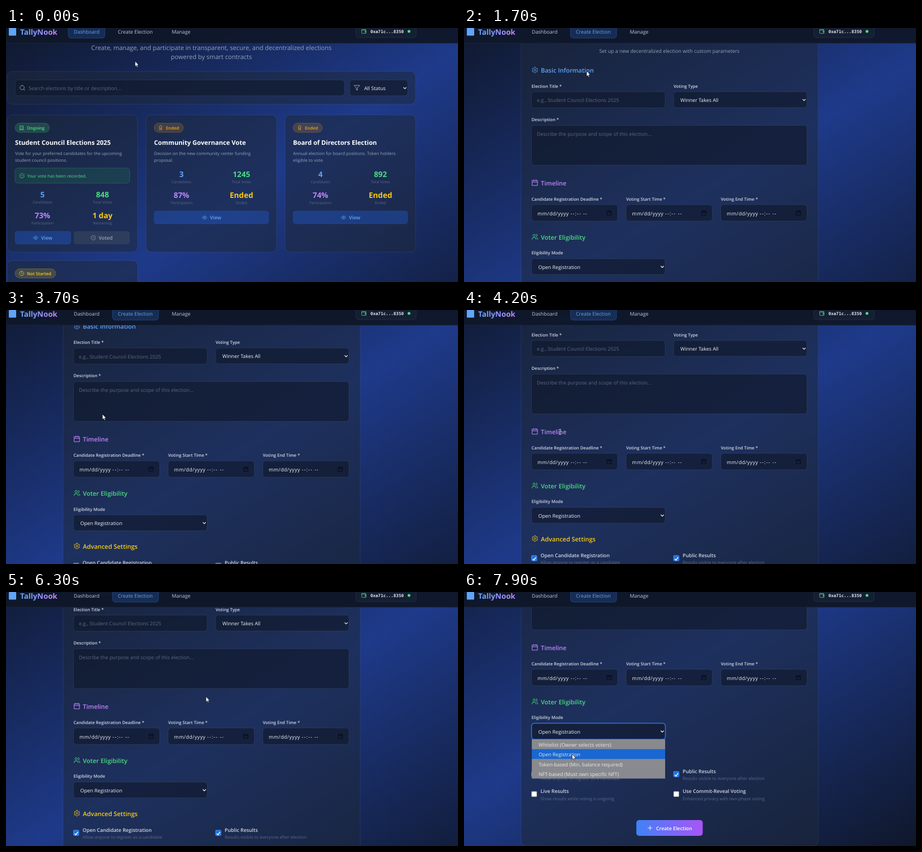
An HTML page for the animation above (8 s loop, 800 px wide and 450 px high).

```html
<!DOCTYPE html>
<html lang="en">
<head>
<meta charset="utf-8">
<title>Election dashboard</title>
<style>
html, body { margin: 0; width: 100%; height: 100%; overflow: hidden; background: #0f172a; }
svg { display: block; width: 800px; height: 450px; }
text { font-family: "Open Sans", "Noto Sans", sans-serif; text-rendering: geometricPrecision; white-space: pre; }
.mono { font-family: "DejaVu Sans Mono", "Noto Sans Mono", monospace; }
</style>
</head>
<body>
<svg id="stage" viewBox="0 0 800 450"></svg>
<script>
const BLUE = '#60a5fa', PURPLE = '#c084fc', GREEN = '#4ade80', YELLOW = '#facc15', ORANGE = '#f0a020';
const MUTED = '#94a3b8', FAINT = '#5b6985', LIGHT = '#d3d8e2';
const FIELD = 'rgba(15,23,42,.62)', EDGE = 'rgba(148,163,184,.13)', PANEL = 'rgba(30,41,59,.55)';

const ring = (x, y, r) => `M${x} ${y - r}a${r} ${r} 0 1 0 .01 0`;
const gear = 'M' + Array.from({ length: 49 }, (_, i) => {
  const a = i * Math.PI / 24, r = 8.8 + 1.5 * Math.cos(6 * a);
  return (12 + r * Math.sin(a)).toFixed(1) + ' ' + (12 - r * Math.cos(a)).toFixed(1);
}).join('L') + 'z' + ring(12, 12, 3);
const ICONS = {
  gear,
  calendar: 'M3 4h18v18H3zM8 2v4M16 2v4M3 10h18',
  users: 'M16 21v-2a4 4 0 0 0-4-4H6a4 4 0 0 0-4 4v2' + ring(9, 7, 4) + 'M22 21v-2a4 4 0 0 0-3-4M16 3a4 4 0 0 1 0 8',
  eye: 'M2 12s4-7 10-7 10 7 10 7-4 7-10 7S2 12 2 12z' + ring(12, 12, 3),
  check: 'M22 11v1a10 10 0 1 1-6-9M9 11l3 3L22 4',
  search: ring(11, 11, 8) + 'M21 21l-4-4',
  filter: 'M22 3H2l8 9.5V19l4 2v-8.5z',
  award: ring(12, 8, 6) + 'M15.5 13L17 22l-5-3-5 3 1.5-9',
  clock: ring(12, 12, 10) + 'M12 6v6l4 2',
  vote: 'M5 4h14v14H5zM2 21h20M9 11l2 2 4-4',
  wallet: 'M20 7V3H4a2 2 0 0 0 0 4h17v14H4a2 2 0 0 1-2-2V5M17 12v4h4v-4z',
  chevron: 'M5 9l7 7 7-7',
  plus: 'M12 4v16M4 12h16'
};

const text = (x, y, s, size, fill, weight = 400, more = '') =>
  `<text x="${x}" y="${y}" font-size="${size}" fill="${fill}" font-weight="${weight}" ${more}>${s}</text>`;
const mid = (x, y, s, size, fill, weight) => text(x, y, s, size, fill, weight, 'text-anchor="middle"');
const box = (x, y, w, h, r, fill, stroke = 'none', more = '') =>
  `<rect x="${x}" y="${y}" width="${w}" height="${h}" rx="${r}" fill="${fill}" stroke="${stroke}" ${more}/>`;
// Icon centred on x, y
const icon = (name, x, y, size, color, width = 2) =>
  `<path d="${ICONS[name]}" transform="translate(${x - size / 2} ${y - size / 2}) scale(${size / 24})" fill="none" stroke="${color}" stroke-width="${width}" stroke-linecap="round" stroke-linejoin="round"/>`;
const field = (x, y, w, h) => box(x, y, w, h, 5, FIELD, EDGE);
const select = (x, y, w, s) => field(x, y, w, 28) + text(x + 12, y + 18, s, 8.85, '#f1f5f9') +
  icon('chevron', x + w - 5, y + 14.3, 8, '#f1f5f9', 3.6);
const label = (x, y, s) => text(x, y, s, 7.65, LIGHT, 600);
const heading = (y, s, name, color) => icon(name, 125.5, y - 4.5, 12, color) + text(136, y, s, 10.95, color, 600);

// Diagonal background whose brightest line crosses the left edge at `centre`
function backdrop(id, slope, centre, half) {
  const at = v => [v * slope / (slope * slope + 1), v / (slope * slope + 1)];
  const [x1, y1] = at(centre - half), [x2, y2] = at(centre + half);
  return `<linearGradient id="${id}" gradientUnits="userSpaceOnUse" x1="${x1}" y1="${y1}" x2="${x2}" y2="${y2}">
    <stop stop-color="#0f172a"/><stop offset=".5" stop-color="#1e3a8a"/><stop offset="1" stop-color="#0f172a"/></linearGradient>
    <rect y="-100" width="800" height="1000" fill="url(#${id})"/>`;
}

function badge(x, y, w, s, name, color) {
  return `<g>${box(x, y, w, 16.5, 8.2, color, color, 'fill-opacity=".18" stroke-opacity=".22"')}
    ${icon(name, x + 11.7, y + 8.2, 9.5, color)}${text(x + 21, y + 11.8, s, 7.7, color, 600)}</g>`;
}

function card(x, y, status, title, lines, stats, voted) {
  const l = x + 14, top = voted ? 299.5 : 263.5, by = voted ? 360 : 324, bw = voted ? 99 : 203;
  const colors = [BLUE, GREEN, PURPLE, YELLOW];
  let s = box(x, y, 231, 243, 9, PANEL, EDGE) + badge(l, y + 14.5, ...status);
  if (!title) return s;
  s += text(l, 207, title, 11.15, '#fff', 700);
  lines.forEach((line, i) => s += text(l, 225 + i * 11.6, line, 7.75, MUTED));
  if (voted) {
    s += box(l, 248, 203, 27, 5, 'rgba(34,197,94,.12)', 'rgba(34,197,94,.25)') +
      icon('check', l + 12.3, 261.7, 9.5, GREEN) + text(l + 21.5, 265, 'Your vote has been recorded.', 7.7, GREEN);
  }
  stats.forEach(([value, name], i) => {
    const cx = x + (i % 2 ? 168.7 : 62.5), cy = top + (i > 1 ? 37.6 : 0);
    s += mid(cx, cy, value, 13.5, colors[i], 700) + mid(cx, cy + 11, name, 6.65, FAINT);
  });
  const vx = voted ? 62 : 361;
  const ex = voted ? vx : x + 113;
  s += box(l, by, bw, 23, 4.5, 'rgba(37,99,235,.32)', 'rgba(59,130,246,.12)') +
    icon('eye', ex - 9.5, by + 11.7, 9.5, BLUE) + text(ex, by + 15.3, 'View', 8.8, BLUE, 600);
  if (voted) {
    s += box(120, by, 99, 23, 4.5, 'rgba(75,85,99,.38)') +
      icon('check', 154.7, by + 11.5, 9.5, MUTED) + text(164, by + 15.3, 'Voted', 8.8, MUTED, 600);
  }
  return s;
}

function dashboard() {
  const stats = (a, b, c, d, e) => [[a, 'Candidates'], [b, 'Total Votes'], [c, 'Participation'], [d, e]];
  const ended = [52, 'Ended', 'award', ORANGE];
  return backdrop('bgA', .67, 575, 590) +
    mid(363.5, 38.5, 'Create, manage, and participate in transparent, secure, and decentralized elections', 11.05, MUTED) +
    mid(363.5, 55, 'powered by smart contracts', 11.05, MUTED) +
    box(2, 77, 723, 58, 9, PANEL, EDGE) +
    field(16, 92, 583, 28) + icon('search', 29, 106, 11.5, MUTED) +
    text(40, 109.6, 'Search elections by title or description...', 8.85, FAINT) +
    field(608.5, 92, 102.5, 28) + icon('filter', 621, 106, 11.5, MUTED) +
    text(634, 109.6, 'All Status', 8.85, '#f1f5f9') + icon('chevron', 706, 106.3, 8, '#f1f5f9', 3.6) +
    card(2, 154, [61, 'Ongoing', 'vote', GREEN], 'Student Council Elections 2025',
      ['Vote for your preferred candidates for the upcoming', 'student council positions.'],
      stats('5', '848', '73%', '1 day', 'Remaining'), true) +
    card(248, 154, ended, 'Community Governance Vote',
      ['Decision on the new community center funding', 'proposal.'],
      stats('3', '1245', '87%', 'Ended', 'Ended')) +
    card(494, 154, ended, 'Board of Directors Election',
      ['Annual election for board positions. Token holders', 'eligible to vote.'],
      stats('4', '892', '74%', 'Ended', 'Ended')) +
    card(2, 412, [72, 'Not Started', 'clock', YELLOW]);
}

function dateField(x, name) {
  return label(x, 305.5, name) + field(x, 313, 152.5, 29) +
    text(x + 10.5, 331.8, 'mm/dd/yyyy', 8.85, '#f1f5f9', 400, 'letter-spacing=".4"') +
    text(x + 69, 331.8, '--:--', 8.85, '#f1f5f9', 400, 'letter-spacing="1.1"') +
    text(x + 91.5, 331.8, '--', 8.85, '#f1f5f9', 400, 'letter-spacing="1"') +
    icon('calendar', x + 137.5, 327.5, 9.5, '#070b16', 2.4);
}

function option(x, y, on, title, note) {
  const tick = on ? `<path d="M${x + 2} ${y + 1.2}l2.1 2.2 3.7-4.8" fill="none" stroke="#fff" stroke-width="1.5"/>` : '';
  return box(x, y - 4.7, 9.4, 9.4, 1.3, on ? '#1a73e8' : '#fff', on ? '#8ab4f8' : '#767676', 'stroke-width=".6"') + tick +
    text(x + 16, y - 1.6, title, 8.8, LIGHT, 600) + text(x + 16, y + 10.6, note, 7.75, FAINT);
}

function menu() {
  const rows = ['Whitelist (Owner selects voters)', 'Open Registration',
    'Token-based (Min. balance required)', 'NFT-based (Must own specific NFT)'];
  return `<g id="menu">${box(119.5, 408.5, 237, 28.5, 5, 'none', '#2f6fe4', 'stroke-width="1.5"')}
    ${box(120, 437, 236, 69.5, 0, '#898a8f')}${box(120, 0, 236, 17.4, 0, '#1967d2', 'none', 'id="pick"')}
    ${rows.map((r, i) => text(132, 450 + i * 17.35, r, 8.8, '#e9eaed')).join('')}</g>`;
}

function form() {
  return box(101, -30, 526, 656, 9, PANEL, EDGE) +
    mid(363.5, 44, 'Set up a new decentralized election with custom parameters', 8.85, MUTED) +
    heading(79, 'Basic Information', 'gear', BLUE) +
    label(119.5, 105.6, 'Election Title *') + field(119.5, 113, 236.5, 28.5) +
    text(129, 131.2, 'e.g., Student Council Elections 2025', 8.85, FAINT) +
    label(371, 105.6, 'Voting Type') + select(371, 113, 236, 'Winner Takes All') +
    label(119.5, 165, 'Description *') + field(119.5, 172.5, 487.5, 70.5) +
    text(129, 191, 'Describe the purpose and scope of this election...', 8.85, FAINT) +
    heading(278.5, 'Timeline', 'calendar', PURPLE) +
    dateField(119.5, 'Candidate Registration Deadline *') +
    dateField(287, 'Voting Start Time *') + dateField(454.5, 'Voting End Time *') +
    heading(374.5, 'Voter Eligibility', 'users', GREEN) +
    label(119.5, 401.3, 'Eligibility Mode') + select(119.5, 408.7, 236.5, 'Open Registration') +
    heading(468.5, 'Advanced Settings', 'gear', YELLOW) +
    option(119.5, 498.7, true, 'Open Candidate Registration', 'Allow anyone to register as a candidate') +
    option(371, 498.7, true, 'Public Results', 'Results visible to everyone after election') +
    option(119.5, 534, false, 'Live Results', 'Show results while voting is ongoing') +
    option(371, 534, false, 'Use Commit-Reveal Voting', 'Enhanced privacy with two-phase voting') +
    box(305, 580, 117.5, 28, 5, 'url(#action)') + icon('plus', 329.3, 594, 10.5, '#fff') +
    text(340, 597.7, 'Create Election', 8.75, '#fff', 600) + menu();
}

function nav() {
  return `<rect width="800" height="27" fill="#0f172a" opacity=".96"/><path d="M0 27h800" stroke="#1e2a48" stroke-width=".7"/>` +
    box(5, 0, 13, 13.5, 1, BLUE) + text(25, 11.8, 'TallyNook', 13.3, 'url(#brand)', 700) +
    box(110, -6, 65, 24, 5, '#3b82f6', '#3b82f6', 'id="tabA" fill-opacity=".2" stroke-opacity=".3"') +
    box(188.5, -6, 81.5, 24, 5, '#3b82f6', '#3b82f6', 'id="tabB" fill-opacity=".2" stroke-opacity=".3"') +
    text(120, 9.8, 'Dashboard', 8.85, LIGHT, 400, 'id="linkA"') +
    text(198, 9.8, 'Create Election', 8.85, LIGHT, 400, 'id="linkB"') +
    text(293.5, 9.8, 'Manage', 8.85, '#c3c9d5') +
    box(619, -8, 107, 25, 5, 'rgba(30,41,59,.45)', EDGE) + icon('wallet', 633.5, 6, 9.5, GREEN) +
    text(645, 9, '0xa71c...8350', 7.54, '#e5e7eb', 700, 'class="mono"') + `<circle cx="713.3" cy="6" r="2.5" fill="${GREEN}"/>`;
}

const cursors = `<g id="cursor" stroke-linejoin="round">
  <path id="arrow" d="M0 0v9.2l2.1-1.9 1.5 3.3 1.5-.7-1.5-3.2h2.9z" fill="#fff" stroke="#0b1020" stroke-width=".6"/>
  <path id="hand" d="M-1 .8q1-1.5 2 0v4l4 .9q1 .4.9 1.5l-.8 4.3h-5.4l-3.3-4.2q.3-1.4 1.5-.7l1.1.8z" fill="#fff" stroke="#0b1020" stroke-width=".6"/>
  <path id="beam" d="M-2-4.5h1.3l.7.6.7-.6H2M0-4v8M-2 4.5h1.3l.7-.6.7.6H2" fill="none" stroke="#dfe3ea" stroke-width=".9"/></g>`;

document.getElementById('stage').innerHTML = `<defs>
  <linearGradient id="brand"><stop stop-color="${BLUE}"/><stop offset="1" stop-color="${PURPLE}"/></linearGradient>
  <linearGradient id="action"><stop stop-color="#3f82f6"/><stop offset="1" stop-color="#a855f7"/></linearGradient></defs>
  <g id="home">${dashboard()}</g>
  <g id="create"><g id="page">${backdrop('bgB', .61, 548, 570)}${form()}</g></g>${nav()}${cursors}`;

const el = id => document.getElementById(id);
const show = (id, on) => el(id).setAttribute('visibility', on ? 'inherit' : 'hidden');
const set = (id, attrs) => { for (const k in attrs) el(id).setAttribute(k, attrs[k]); };

// Eased value along [time, ...values] keys
function track(keys, t) {
  const i = keys.findIndex(k => k[0] > t);
  if (i < 0) return keys[keys.length - 1].slice(1);
  const [a, b] = [keys[i - 1], keys[i]];
  const u = (t - a[0]) / (b[0] - a[0]), e = u * u * (3 - 2 * u);
  return a.slice(1).map((v, j) => v + (b[j + 1] - v) * e);
}

const SCROLL = [[0, 0], [3250, 0], [3900, 59], [5800, 59], [6200, 72], [6350, 72], [6750, 176]];
const MOUSE = [[0, 228.5, 59], [600, 225.5, 14.5], [1400, 225.5, 14.5], [1850, 214, 98], [2300, 95, 178], [2700, 171.5, 153.5],
  [3400, 171.5, 153.5], [4000, 170, 216], [4250, 170, 216], [4600, 112, 245], [5000, 250, 257], [5400, 382, 257],
  [5900, 354, 185.5], [6350, 354, 185.5], [6750, 200, 246], [6900, 200, 246], [7150, 167, 302], [7300, 167, 302], [7800, 191.5, 287.5]];
const SWITCH = 1300, OPEN = 6850;

function draw(t) {
  const [scroll] = track(SCROLL, t), [x, y] = track(MOUSE, t);
  const created = t >= SWITCH, hover = y < 18;
  show('home', !created);
  show('create', created);
  set('page', { transform: `translate(0 ${-scroll})` });
  show('tabA', !created);
  show('tabB', created || hover);
  set('tabB', created ? { fill: '#3b82f6', 'fill-opacity': .2, 'stroke-opacity': .3 }
    : { fill: '#fff', 'fill-opacity': .05, 'stroke-opacity': 0 });
  set('linkA', { fill: created ? '#c3c9d5' : BLUE });
  set('linkB', { fill: created ? BLUE : hover ? '#93c5fd' : '#c3c9d5' });

  show('menu', t >= OPEN);
  const row = Math.floor((y + scroll - 437) / 17.35);
  set('pick', { y: 437 + 17.35 * (row < 0 ? 1 : row) });

  const beam = t >= 3900 && t < 4400;
  set('cursor', { transform: `translate(${x} ${y})` });
  show('arrow', !hover && !beam);
  show('hand', hover);
  show('beam', beam);
}

function tick() {
  draw(Math.floor(performance.now() % 8000 / 100) * 100);
  requestAnimationFrame(tick);
}
tick();
</script>
</body>
</html>
```
